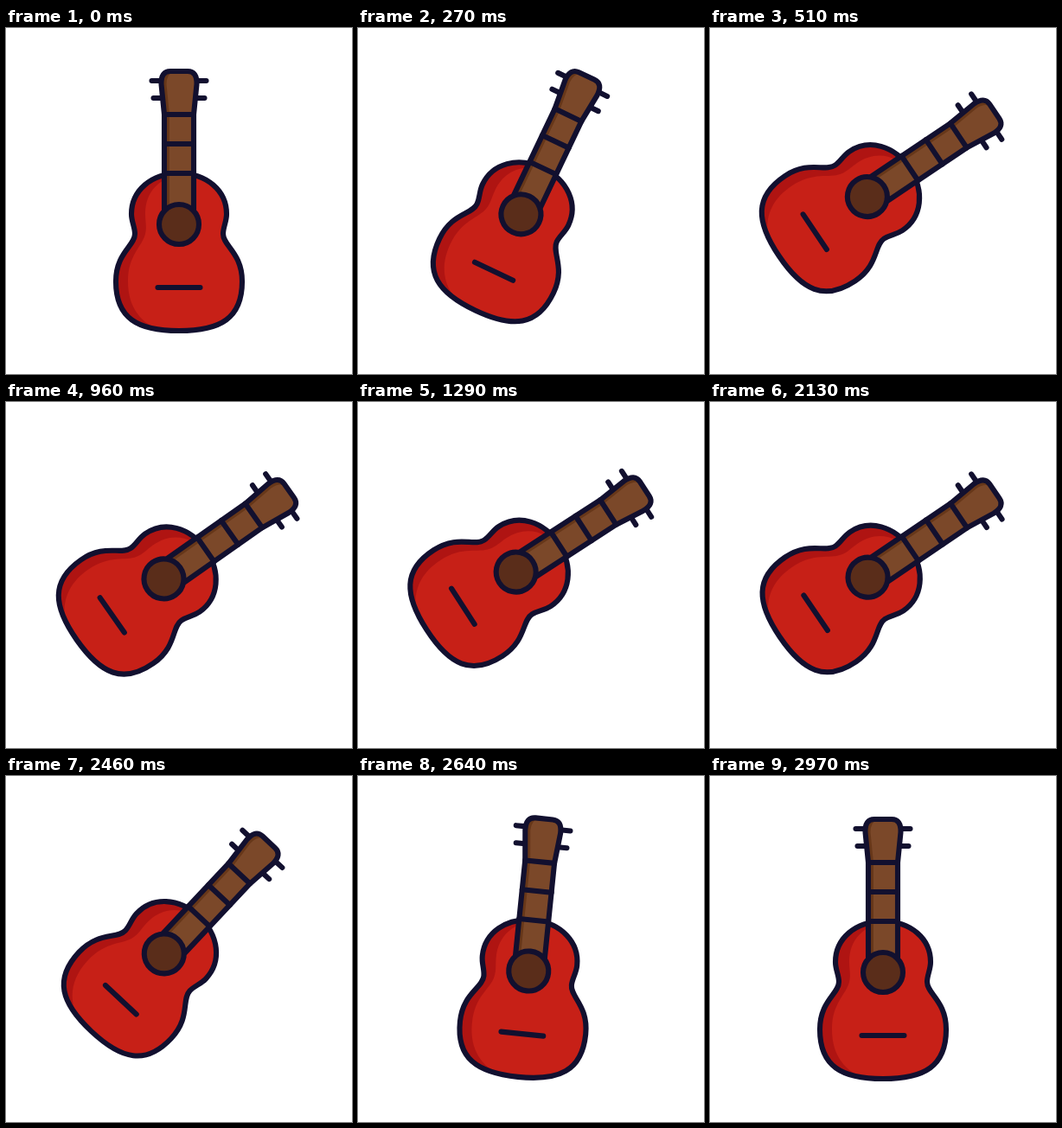
Recreate the animation shown at these times as an HTML page. Size 400 px wide and 400 px high, loop 5000 ms.

```html
<!DOCTYPE html>
<html lang="en">
<head>
<meta charset="utf-8">
<title>Guitar</title>
<style>
  html, body { margin: 0; width: 100%; height: 100%; overflow: hidden; background: #fff; }
  svg { display: block; width: 100%; height: 100%; }
  .line { fill: none; stroke: #12102f; stroke-width: 6.1; stroke-linecap: round; stroke-linejoin: round; }
</style>
</head>
<body>
<svg viewBox="0 0 400 400">
  <defs>
    <path id="body" d="M200 168C168 168 145 188 145 215C145 224 149 230 149 238C149 252 127 260 127 293C127 335.500 152 350 200 350C248 350 273 335.500 273 293C273 260 251 252 251 238C251 230 255 224 255 215C255 188 232 168 200 168Z"/>
    <path id="neck" d="M183 210V100L179.500 65Q179 50 190 50H210Q221 50 220.500 65L217 100V210Z"/>
    <clipPath id="inBody"><use href="#body"/></clipPath>
    <clipPath id="inNeck"><use href="#neck"/></clipPath>
  </defs>
  <g id="guitar">
    <path class="line" d="M168.500 61H178M222 61H231.500M170.500 81H181M219 81H229.500"/>
    <use href="#body" fill="#af1412"/>
    <path clip-path="url(#inBody)" fill="#c72017" d="M208 168C176 172 161 190 161 215C161 224 163 230 161 238C158 252 141 262 141 293C141 325 158 343 182 351H290V168Z"/>
    <use href="#body" class="line"/>
    <use href="#neck" fill="#673719"/>
    <path clip-path="url(#inNeck)" fill="#7b4829" d="M189 210V100L185.500 65Q185.500 53 194 50H225V210Z"/>
    <use href="#neck" class="line"/>
    <path class="line" d="M183 100H217M183 134H217M183 168H217M175.500 300H224.500"/>
    <circle cx="200" cy="227" r="23" fill="#5a2d1a"/>
    <circle cx="200" cy="227" r="23" class="line"/>
  </g>
</svg>
<script>
  const LOOP = 5000, STEP = 30, END = 2970;
  const STRUM_START = 600, STRUM_END = 2310, STRUM_PERIOD = 570;
  const SWING_END = 2775, OVERSHOOT = -8;
  const guitar = document.getElementById('guitar');

  const ease = (t, from, to) => {
    const p = Math.min(1, Math.max(0, (t - from) / (to - from)));
    return p * p * (3 - 2 * p);
  };
  const mix = (a, b, p) => a + (b - a) * p;

  // The tilt runs slightly ahead of the vertical bounce.
  function strum(t) {
    const wave = shift => Math.cos(2 * Math.PI * ((t - STRUM_START) / STRUM_PERIOD + shift));
    return {
      angle: 56.7 + 3.1 * wave(0.02),
      x: 5.2 + 1.1 * wave(0.02),
      y: -15.7 - 5.7 * wave(-0.03)
    };
  }

  function pose(t) {
    const held = strum(Math.min(STRUM_END, Math.max(STRUM_START, t)));
    if (t < STRUM_START) {
      const p = ease(t, 0, STRUM_START);
      return { angle: held.angle * p, x: held.x * ease(t, 360, STRUM_START), y: held.y * p };
    }
    if (t <= STRUM_END) return held;
    // Swing past upright, then settle.
    const swing = mix(held.angle, OVERSHOOT, ease(t, STRUM_END, SWING_END));
    return {
      angle: mix(swing, 0, ease(t, SWING_END, END)),
      x: mix(held.x, 0, ease(t, STRUM_END, 2520)),
      y: mix(held.y, 0, ease(t, STRUM_END, 2700))
    };
  }

  const start = performance.now();
  function draw(now) {
    const elapsed = Math.max(0, now - start) % LOOP;
    const { angle, x, y } = pose(Math.min(END, Math.floor(elapsed / STEP) * STEP));
    guitar.setAttribute('transform', `translate(${x} ${y}) rotate(${angle} 200 200)`);
    requestAnimationFrame(draw);
  }
  draw(start);
</script>
</body>
</html>
```
